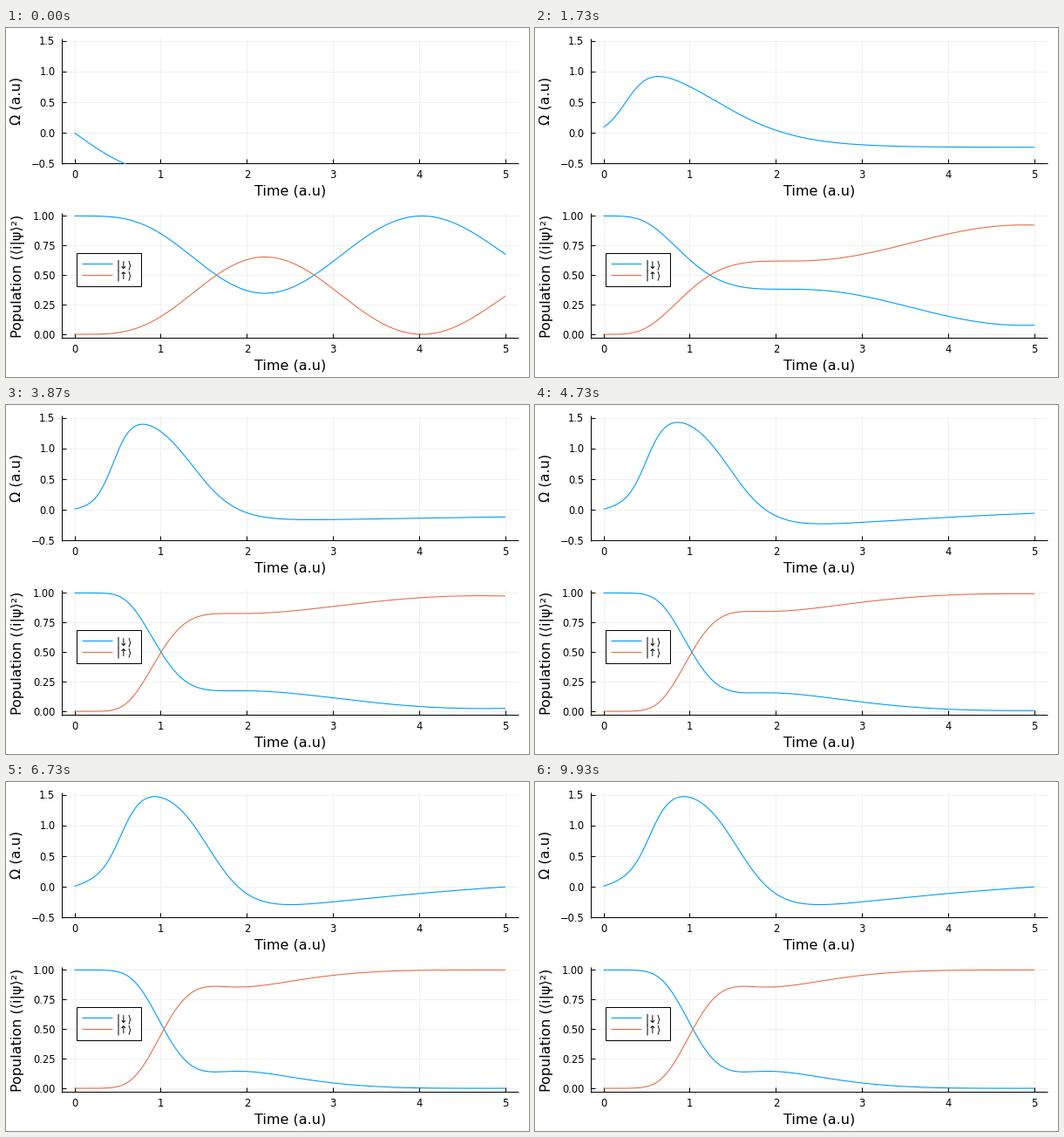
A matplotlib script that plays this animation: 600x400 px, repeating every 9.99 s.

```python
import numpy as np
import matplotlib.pyplot as plt
from matplotlib.animation import FuncAnimation
from matplotlib.patches import Rectangle

plt.rcParams["font.family"] = "DejaVu Sans"

FRAMES = 150
BLUE, ORANGE, GRID = "#009afa", "#e36f47", "#f0f0f0"
PX = 0.72  # one pixel in points at 100 dpi
LEFT, RIGHT = 64, 588

# Training stages of the drive pulse. Each row holds:
# level, tail size, fall (size, rate, centre), rise (size, rate, centre)
STAGE_FRAMES = np.array([0, 5, 16, 37, 58, 88])
STAGES = np.array([
    [-.56, .35, 0, 1.2, 1.3, -1.82, 2.42, 0],
    [-.2, 0, 2.6, 1.2, 1.8, 2.8, 5, .2],
    [-.298, 0, 1.32, 1.22, 1.3, 1, 5.7, .2],
    [-.177, 0, 1.8, 2.9, 1.235, 1.6, 8.6, .317],
    [-.05, .25, 1.9, 3.88, 1.364, 1.6, 9.2, .452],
    [.35, 1.349, 2.4, 4.08, 1.545, 1.4, 8.5, .54],
])


def sigmoid(x):
    return 1 / (1 + np.exp(-x))


def pulse(t, stage):
    level, tail, fall, fall_rate, fall_t, rise, rise_rate, rise_t = stage
    return (level - tail * np.exp(-.27 * t)
            + fall * sigmoid(fall_rate * (fall_t - t))
            - rise * sigmoid(rise_rate * (rise_t - t)))


def stage_at(frame):
    """Ease out from each training stage to the next."""
    k = np.searchsorted(STAGE_FRAMES, frame, side="right") - 1
    if k == len(STAGES) - 1:
        return STAGES[k]
    u = (frame - STAGE_FRAMES[k]) / (STAGE_FRAMES[k + 1] - STAGE_FRAMES[k])
    return STAGES[k] + (STAGES[k + 1] - STAGES[k]) * (1 - (1 - u) ** 1.3)


def evolve(drive, dt, detuning=1.0):
    """Upper-state population of a driven two-level system, one row per drive."""
    down = np.ones(len(drive), complex)
    up = np.zeros(len(drive), complex)
    out = np.zeros_like(drive)
    half = detuning / 2
    for i in range(1, drive.shape[1]):
        w = (drive[:, i] + drive[:, i - 1]) / 2
        e = np.hypot(w, half)
        c, s = np.cos(e * dt), -1j * np.sin(e * dt) / e
        down, up = (c * down + s * (half * down + w * up),
                    c * up + s * (w * down - half * up))
        out[:, i] = abs(up) ** 2
    return out


t = np.linspace(0, 5, 501)
drive = np.array([pulse(t, stage_at(i)) for i in range(FRAMES)])
upper = evolve(drive, t[1])


def time_x(v):
    return 78.6 + 98.87 * v


def drive_y(v):
    return 120.2 - 70.35 * v


def pop_y(v):
    return 351.1 - 135.7 * v


fig = plt.figure(figsize=(6, 4), dpi=100, facecolor="white")
ax = fig.add_axes([0, 0, 1, 1])
ax.set(xlim=(0, 600), ylim=(400, 0))
ax.axis("off")


def line(xs, ys, color="black", width=1.0, z=2):
    return ax.plot(xs, ys, color=color, lw=width * PX, zorder=z,
                   solid_capstyle="butt")[0]


def label(x, y, text, size=8.3, ha="center", turn=0):
    ax.text(x, y, text, size=size, ha=ha, va="baseline", rotation=turn,
            rotation_mode="anchor", zorder=6)


def panel(top, bottom, to_y, ticks, fmt):
    for v in range(6):
        x = time_x(v)
        line([x, x], [top, bottom], GRID, z=1)
        line([x, x], [bottom, bottom - 5])
        label(x, bottom + 16.5, str(v))
    for v in ticks:
        y = to_y(v)
        line([LEFT, RIGHT], [y, y], GRID, z=1)
        line([LEFT, LEFT + 5], [y, y])
        label(56.5, y + 4.6, format(v, fmt).replace("-", "\u2212"), ha="right")
    line([LEFT, LEFT], [top, bottom + 1])
    line([LEFT, RIGHT], [bottom, bottom])
    label(326.5, bottom + 37, "Time (a.u)", 11.5)


panel(12, 155, drive_y, [-.5, 0, .5, 1, 1.5], ".1f")
panel(212, 355, pop_y, [0, .25, .5, .75, 1], ".2f")
label(16.8, 83.5, "Ω (a.u)", 11.5, turn=90)
label(18.2, 284, "Population (⟨i|ψ⟩²)", 11.5, turn=90)

xs = time_x(t)
drive_line = line(xs, drive_y(drive[0]), BLUE, 1.1, 3)
drive_line.set_clip_path(Rectangle((LEFT, 11), RIGHT - LEFT, 145,
                                   transform=ax.transData))
down_line = line(xs, pop_y(1 - upper[0]), BLUE, 1.1, 3)
up_line = line(xs, pop_y(upper[0]), ORANGE, 1.1, 3)

ax.add_patch(Rectangle((81, 258), 74, 38, fc="white", ec="black",
                       lw=PX, zorder=4))
for y, color, text in [(270, BLUE, "|↓⟩"), (283, ORANGE, "|↑⟩")]:
    line([87, 122], [y, y], color, 1.1, 5)
    label(126, y + 5, text, ha="left")


def update(i):
    drive_line.set_ydata(drive_y(drive[i]))
    down_line.set_ydata(pop_y(1 - upper[i]))
    up_line.set_ydata(pop_y(upper[i]))
    return drive_line, down_line, up_line


anim = FuncAnimation(fig, update, frames=FRAMES, interval=66.6,
                     repeat=True, repeat_delay=0)
plt.show()
```
